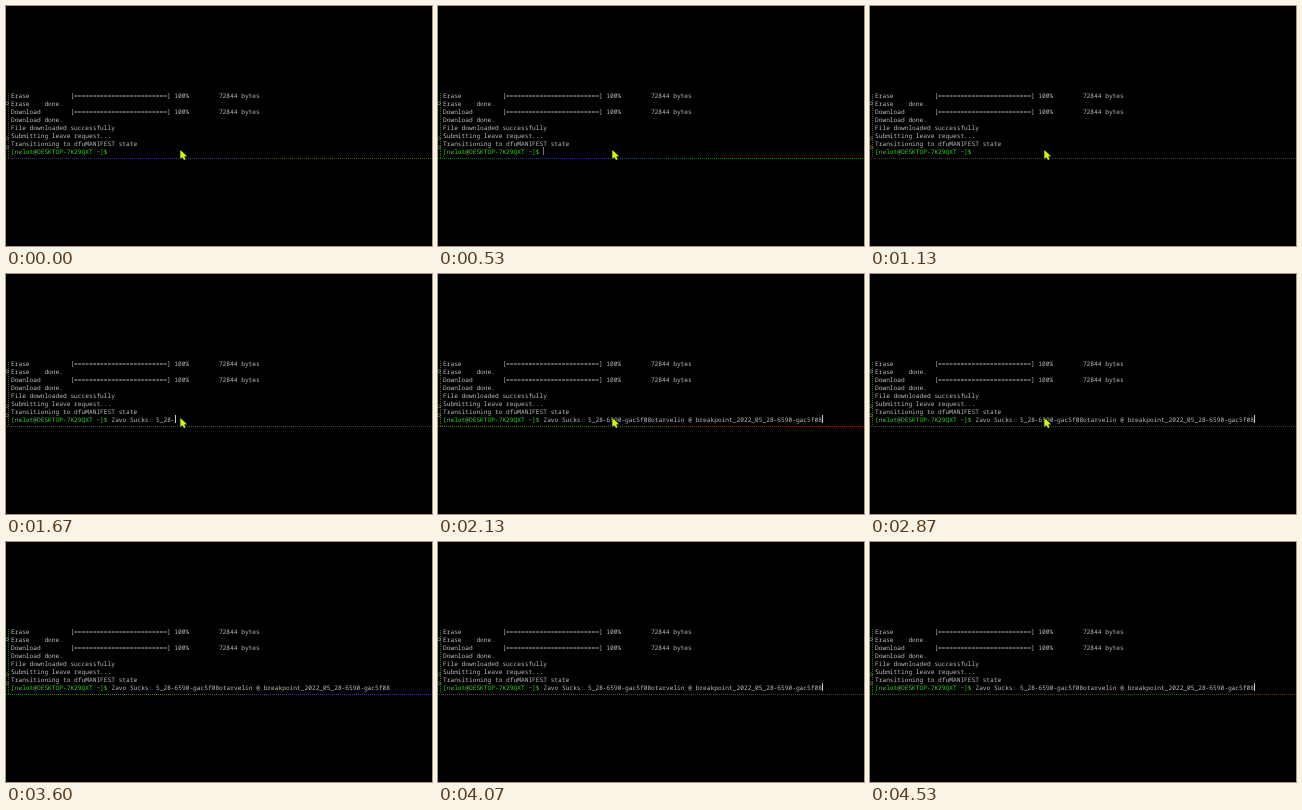
Write an HTML page with a canvas that moves like this. It is 426 px wide and 240 px high and loops after 4590 ms.

```html
<!DOCTYPE html>
<html lang="en">
<head>
<meta charset="utf-8">
<title>Terminal</title>
<style>
  html, body { margin: 0; width: 100%; height: 100%; overflow: hidden; background: #000; }
  canvas { display: block; width: 426px; height: 240px; }
</style>
</head>
<body>
<canvas width="426" height="240"></canvas>
<script>
const ctx = document.querySelector('canvas').getContext('2d');
const LOOP = 4590, STEP = 1000 / 15;
const CHAR = 3.72, LEFT = 5, TOP = 92.2, PITCH = 7.9;
const GRAY = '#bcbcbc', GREEN = '#3ecb32';

const bar = name => `${name.padEnd(16)}[${'='.repeat(25)}] 100%        72844 bytes`;
const output = [
  bar('Erase'), 'Erase    done.', bar('Download'), 'Download done.',
  'File downloaded successfully', 'Submitting leave request...',
  'Transitioning to dfuMANIFEST state'
];
const prompt = '[nelot@DESKTOP-7K29QXT ~]$ ';
const typed = 'Zavo Sucks: 5_28-6590-gac5f08otarvelin @ breakpoint_2022_05_28-6590-gac5f08';
const TYPE_START = 1600, TYPE_TIME = 300;
const BLINK_START = 450, BLINK = 600;
const POINTER_END = 3230;

// Border glow: time, then RGB stops from left to right
const glow = [
  [0, [60, 60, 75], [45, 45, 130], [70, 75, 45], [85, 95, 45]],
  [530, [25, 115, 25], [50, 35, 150], [25, 120, 25], [25, 120, 25]],
  [1130, [60, 60, 60], [65, 65, 65], [65, 65, 65], [60, 60, 60]],
  [2130, [90, 95, 25], [60, 100, 30], [120, 60, 25], [130, 35, 30]],
  [2870, [30, 100, 30], [60, 80, 30], [130, 35, 25], [140, 30, 25]],
  [3600, [30, 120, 30], [95, 110, 25], [60, 60, 120], [65, 45, 140]],
  [4530, [35, 105, 35], [75, 65, 30], [50, 90, 40], [90, 50, 40]]
];

const mix = (a, b, k) => a.map((v, i) => v + (b[i] - v) * k);
const rgb = c => `rgb(${c.map(Math.round)})`;

function text(str, col, row, color) {
  ctx.fillStyle = color;
  ctx.fillText(str, LEFT + col * CHAR, TOP + row * PITCH);
}

function glowStops(t) {
  let i = glow.length - 1;
  while (glow[i][0] > t) i--;
  const next = glow[i + 1] || [LOOP, ...glow[0].slice(1)];
  const k = (t - glow[i][0]) / (next[0] - glow[i][0]);
  return glow[i].slice(1).map((c, n) => mix(c, next[n + 1], k));
}

function drawBorder(t) {
  const stops = glowStops(t);
  const shift = Math.round(t / STEP) % 2;
  for (let x = shift; x < 426; x += 2) {
    const p = x / 426 * 3, n = Math.floor(p);
    ctx.fillStyle = rgb(mix(stops[n], stops[n + 1], p - n));
    ctx.fillRect(x, 152, 1, 1);
  }
  ctx.fillStyle = rgb(mix(stops[0], [110, 100, 20], 0.4));
  for (let y = 87 + shift; y < 152; y += 2) ctx.fillRect(2, y, 1, 1);

  // Slivers of the window behind
  ctx.save();
  ctx.beginPath();
  ctx.rect(0, 86, 3, 66);
  ctx.clip();
  text('o', -1.55, 0.9, '#9aa4c0');
  text('o', -1.55, 5.35, '#8a7868');
  text('o', -1.55, 6.45, '#a09080');
  ctx.restore();
}

function drawPointer() {
  const arrow = new Path2D('M174.3 144 V153 L176.4 151.2 L178 154 L179.6 153.2 L178.2 150.6 L181 150.2 Z');
  ctx.strokeStyle = '#000';
  ctx.stroke(arrow);
  ctx.fillStyle = '#d2f50a';
  ctx.fill(arrow);
}

function draw(now) {
  const t = Math.floor((now % LOOP + 5) / STEP) * STEP;
  const count = Math.round(typed.length * Math.min(1, Math.max(0, (t - TYPE_START) / TYPE_TIME)));
  const typing = count > 0 && count < typed.length;

  ctx.fillStyle = '#000';
  ctx.fillRect(0, 0, 426, 240);
  ctx.font = '6.2px "Noto Sans Mono", "DejaVu Sans Mono", monospace';
  ctx.textRendering = 'geometricPrecision';

  drawBorder(t);
  output.forEach((line, row) => text(line, 0, row, GRAY));
  text(prompt, 0, 7, GREEN);
  text(typed.slice(0, count), prompt.length, 7, GRAY);

  if (typing || t >= BLINK_START && Math.floor((t - BLINK_START) / BLINK) % 2 === 0) {
    ctx.fillStyle = count ? '#c8c8c8' : '#d0602a';
    ctx.fillRect(Math.round(LEFT + (prompt.length + count) * CHAR), 141, 1, 8);
  }
  if (t < POINTER_END) drawPointer();
  requestAnimationFrame(() => draw(performance.now()));
}
draw(0);
</script>
</body>
</html>
```
